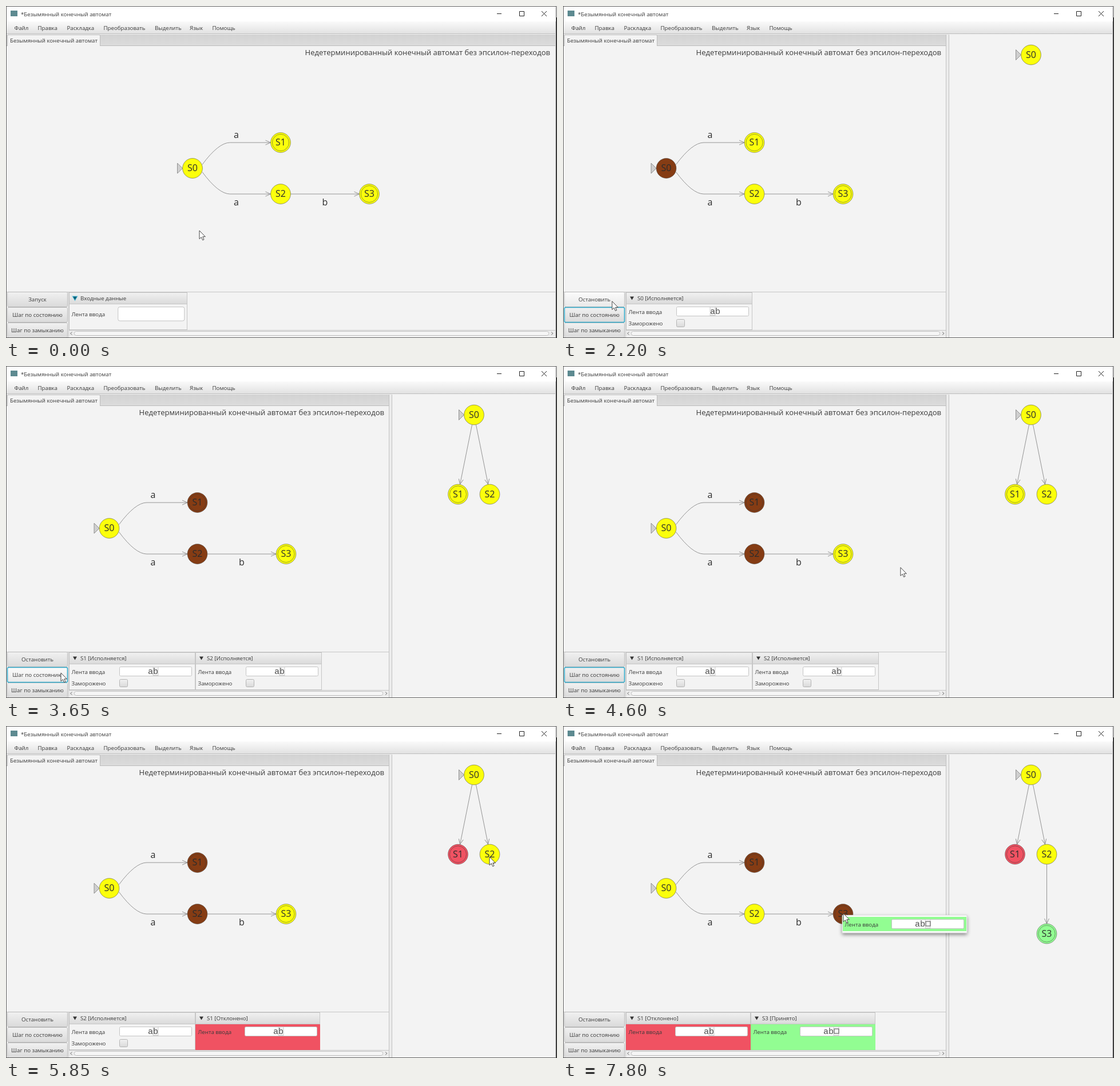
Write an HTML page that moves like this. It is 963x581 px and loops after 8 s.

```html
<!DOCTYPE html>
<html lang="ru">
<head>
<meta charset="utf-8">
<title>Конечный автомат</title>
<style>
html, body { margin: 0; width: 100%; height: 100%; overflow: hidden; background: #f3f3f3; }
svg { display: block; }
text { font: 9.7px "Open Sans", "Noto Sans", sans-serif; fill: #3a3a3a; white-space: pre; }
.head { font-size: 13.05px; }
.node { font-size: 16px; fill: #2c2c2c; }
.mono { font: 15px "Liberation Mono", monospace; fill: #505050; }
.mid { text-anchor: middle; }
.end { text-anchor: end; }
.line { fill: none; stroke: #8a8a8a; stroke-width: .9; }
</style>
</head>
<body>
<svg width="963" height="581" viewBox="0 0 963 581">
  <defs>
    <linearGradient id="bar" x2="0" y2="1"><stop stop-color="#fafafa"/><stop offset="1" stop-color="#e2e2e2"/></linearGradient>
    <linearGradient id="btn" x2="0" y2="1"><stop stop-color="#f1f1f1"/><stop offset="1" stop-color="#dadada"/></linearGradient>
    <linearGradient id="hot" x2="0" y2="1"><stop stop-color="#fbfbfb"/><stop offset="1" stop-color="#e9e9e9"/></linearGradient>
    <linearGradient id="strip" x2="0" y2="1"><stop stop-color="#d2d2d2"/><stop offset="1" stop-color="#dcdcdc"/></linearGradient>
    <filter id="shade" x="-10%" y="-30%" width="120%" height="180%"><feDropShadow dx="0" dy="3" stdDeviation="3" flood-opacity=".45"/></filter>
  </defs>
  <g id="scene"></g>
  <g id="arrow"><path d="M0 0V14.6L3.4 11.5L5.7 16.7L8 15.7L5.8 10.7H10.3Z" fill="#fff" stroke="#333" stroke-width=".9"/></g>
  <g id="beam"><path d="M-2.5-6.5H-.8L0-5.8L.8-6.5H2.5M0-5.8V5.8M-2.5 6.5H-.8L0 5.8L.8 6.5H2.5" fill="none" stroke="#333"/></g>
</svg>
<script>
const LOOP = 8000;
const FOCUS = 850, TYPE_A = 1200, TYPE_B = 1400, RUN = 2050, STEP = 3500,
      REJECT = 5200, ACCEPT = 6050, HINT = 7500;
const YELLOW = '#fbff0c', BROWN = '#853c14', RED = '#f05262', GREEN = '#92fd92', BLUE = '#2fa9c9';
const $ = id => document.getElementById(id);

// Pointer stops: time, x, y
const stops = [
  [0, 338, 393], [50, 338, 393], [850, 262, 539], [1500, 262, 539], [1950, 85, 515], [2150, 85, 515],
  [2450, 96, 537], [4250, 96, 537], [4600, 589, 353], [4980, 790, 228], [5500, 790, 228],
  [5850, 845, 229], [6700, 845, 229], [6800, 793, 245], [6900, 558, 305], [7080, 490, 328], [LOOP, 490, 328]
];

function speed(i, axis) {
  const a = stops[i - 1], b = stops[i], c = stops[i + 1];
  if (!a || !c || a[1] === b[1] || b[1] === c[1]) return 0;
  return (c[axis] - a[axis]) / (c[0] - a[0]);
}

function pointer(t) {
  const i = stops.findIndex(s => s[0] > t) - 1;
  const p = stops[i], q = stops[i + 1], span = q[0] - p[0], u = (t - p[0]) / span;
  return [1, 2].map(k => {
    const ease = u * u * (3 - 2 * u);
    return p[k] + (q[k] - p[k]) * ease +
      span * u * (1 - u) * (speed(i, k) * (1 - u) - speed(i + 1, k) * u);
  });
}

const rect = (x, y, w, h, fill, stroke = 'none', extra = '') =>
  `<rect x="${x}" y="${y}" width="${w}" height="${h}" fill="${fill}" stroke="${stroke}" ${extra}/>`;
const text = (x, y, s, cls = '') => `<text x="${x}" y="${y}" class="${cls}">${s}</text>`;
const path = (d, extra = 'class="line"') => `<path d="${d}" ${extra}/>`;

function node(x, y, name, fill = YELLOW, final = false) {
  const ring = r =>
    `<circle cx="${x}" cy="${y}" r="${r}" fill="${fill}" stroke="#333" stroke-opacity=".6" stroke-width=".8"/>`;
  return ring(17.4) + (final ? ring(14.6) : '') + text(x, y + 5.2, name, 'node mid');
}

const startMark = (x, y) =>
  path(`M${x - 26.5} ${y - 9}V${y + 9}L${x - 17.5} ${y}Z`, 'fill="#cfcfcf" stroke="#888" stroke-width=".9"');

function tip(x, y, angle = 0) {
  return `<path d="M-9-4L0 0L-9 4" class="line" transform="translate(${x} ${y}) rotate(${angle})"/>`;
}

function edge(x1, y1, x2, y2) {
  const angle = Math.atan2(y2 - y1, x2 - x1) * 180 / Math.PI;
  return path(`M${x1} ${y1}L${x2} ${y2}`) + tip(x2, y2, angle);
}

function button(y, label, focused, hovered) {
  return rect(2.5, y + .5, 105, 26, `url(#${hovered ? 'hot' : 'btn'})`, focused ? BLUE : '#b9b9b9',
    `rx="2" stroke-width="${focused ? 1.6 : 1}"`) + text(55, y + 16.5, label, 'mid');
}

// Tape field; the cell under the head stays in the middle
function tape(x, y, head) {
  const mid = x + 63.5;
  const cell = rect(mid - 4.5, y + .5, 9, 15, '#f6f6f6', '#c4c4c4', 'stroke-width=".8"');
  const end = head === 2 ? rect(mid - 3.5, y + 4, 8, 8, 'none', '#505050') : '';
  return rect(x + .5, y + .5, 126, 16, '#fff', '#c4c4c4', 'rx="2"') + cell +
    text(mid - 4.5 - 9 * head, y + 12.5, 'ab', 'mono') + end;
}

function paneHead(x, w, title, glow) {
  const mark = glow ? 'fill="#0b5f78" stroke="#5fc3dc" stroke-width="2" paint-order="stroke"' : 'fill="#333"';
  return rect(x + .5, 501.5, w - 1, 20, 'url(#btn)', '#c6c6c6') +
    path(`M${x + 7} 508.5H${x + 14}L${x + 10.5} 514.5Z`, mark) + text(x + 20, 515, title);
}

function pane(x, name, status, head) {
  const live = status === 'Исполняется', w = live ? 221 : 218;
  const fill = live ? '#f3f3f3' : status === 'Принято' ? GREEN : RED;
  return rect(x + .5, 521.5, w - 1, 45, fill, live ? '#c6c6c6' : fill) +
    paneHead(x, w, `${name} [${status}]`) +
    text(x + 4.5, 538.5, 'Лента ввода') + tape(x + (live ? 88 : 86), 526, head) +
    (live ? text(x + 4.5, 558.5, 'Заморожено') +
      rect(x + 88.5, 548.5, 14, 13, 'url(#btn)', '#b4b4b4', 'rx="2"') : '');
}

function inputPane(t) {
  const focused = t >= FOCUS;
  const typed = t < TYPE_A ? '' : t < TYPE_B ? 'a' : 'ab';
  const since = t - (t < TYPE_A ? FOCUS : t < TYPE_B ? TYPE_A : TYPE_B);
  const caretX = 203.5 + 9 * typed.length;
  return rect(110.5, 521.5, 206, 45, '#f3f3f3', '#c6c6c6') + paneHead(110, 207, 'Входные данные', !focused) +
    text(114.5, 542.5, 'Лента ввода') +
    rect(195.8, 526.7, 116, 24.3, '#fff', focused ? BLUE : '#c2c2c2', `rx="3" stroke-width="${focused ? 1.7 : 1}"`) +
    text(203.7, 543, typed, 'mono') +
    (focused && since % 1000 < 500 ? path(`M${caretX} 532V546`, 'stroke="#444"') : '');
}

function windowFrame(right) {
  const menu = [[14.5, 'Файл'], [55.5, 'Правка'], [106.5, 'Раскладка'], [170.5, 'Преобразовать'],
    [260, 'Выделить'], [321, 'Язык'], [360.5, 'Помощь']];
  return rect(0, 0, 963, 581, '#f3f3f3') + rect(0, 0, 963, 27, '#fff') +
    rect(8, 8, 12, 10, '#5d8a90') + text(26, 17.5, '*Безымянный конечный автомат') +
    path('M858 13.5H866M897.5 9.5H905.5V17.5H897.5ZM936 9L945 18M945 9L936 18', 'fill="none" stroke="#222"') +
    rect(0, 27, 963, 21, 'url(#bar)') + path('M0 48.5H961', 'stroke="#bdbdbd"') +
    menu.map(([x, s]) => text(x, 41.5, s)).join('') +
    rect(1, 50, right - 1, 20, 'url(#strip)') + path(`M1 69.5H${right}`, 'stroke="#bcbcbc"') +
    path('M2.5 70V52Q2.5 50.5 4 50.5H163Q164.5 50.5 164.5 52V70', 'fill="#f3f3f3" stroke="#bcbcbc"') +
    text(7, 64, 'Безымянный конечный автомат');
}

// Window border, with the dark desktop showing at the right edge
const windowEdge = () => path('M960.5 27V580', 'stroke="#c8c8c8"') +
  rect(.5, .5, 961, 580, 'none', '#606060') + rect(962, 0, 1, 20, '#d8d8d8') + rect(962, 20, 1, 561, '#1c1c1c');

function scrollBar(right) {
  return path(`M109.5 581V500.5H${right}M109 567.5H${right}`, 'fill="none" stroke="#c6c6c6"') +
    rect(110, 568, right - 110, 11, '#ececec') +
    rect(119.5, 569.5, right - 131, 7, '#f6f6f6', '#c0c0c0', 'rx="3"') +
    path(`M115.5 570.5L112.5 573L115.5 575.5M${right - 7} 570.5L${right - 4} 573L${right - 7} 575.5`,
      'fill="none" stroke="#777"');
}

function automaton(dx, active) {
  const fill = name => active.includes(name) ? BROWN : YELLOW;
  return `<g transform="translate(${dx})">` +
    path('M197.5 277.5Q226 239 246 239H317M197.5 290.5Q226 329 246 329H317M352 329H472') +
    tip(317, 239) + tip(317, 329) + tip(472, 329) + startMark(180.5, 284) +
    node(180.5, 284, 'S0', fill('S0')) + node(334.5, 239, 'S1', fill('S1'), true) +
    node(334.5, 329, 'S2', fill('S2')) + node(489.5, 329, 'S3', fill('S3'), true) +
    text(257, 231, 'a', 'node mid') + text(257, 349, 'a', 'node mid') + text(412, 349, 'b', 'node mid') + '</g>';
}

function tree(t) {
  let s = startMark(818, 85.5) + node(818, 85.5, 'S0');
  if (t >= STEP) s += edge(814.5, 103, 793.5, 207) + edge(821.5, 103, 842.5, 207) +
    node(790, 224.5, 'S1', t < REJECT ? YELLOW : RED, true) + node(845.5, 224.5, 'S2');
  if (t >= ACCEPT) s += edge(845.5, 242, 845.5, 346) + node(845.5, 363.5, 'S3', GREEN, true);
  return s;
}

function panes(t) {
  const live = 'Исполняется', no = 'Отклонено';
  if (t < RUN) return inputPane(t);
  if (t < STEP) return pane(110, 'S0', live, 0);
  if (t < REJECT) return pane(110, 'S1', live, 1) + pane(331, 'S2', live, 1);
  if (t < ACCEPT) return pane(110, 'S2', live, 1) + pane(331, 'S1', no, 1);
  return pane(110, 'S1', no, 1) + pane(328, 'S3', 'Принято', 2);
}

const hint = () => rect(488, 331, 218, 31, '#fbfbfb', '#c8c8c8', 'stroke-width=".6" filter="url(#shade)"') +
  rect(489, 334, 216, 25, GREEN) + text(492.5, 350.5, 'Лента ввода') + tape(574, 338, 2);

function scene(t, x, y) {
  const running = t >= RUN, right = running ? 670 : 960;
  const over = top => x < 108 && y >= top && y < top + 27;
  const active = !running ? [] : t < STEP ? ['S0'] : t < ACCEPT ? ['S1', 'S2'] : ['S1', 'S3'];
  return windowFrame(right) +
    text(running ? 661 : 951, 86, 'Недетерминированный конечный автомат без эпсилон-переходов', 'head end') +
    automaton(running ? 0 : 145.5, active) +
    path(`M1 500.5H${right}`, 'stroke="#c6c6c6"') + scrollBar(right) + panes(t) +
    button(500, running ? 'Остановить' : 'Запуск', false, over(500)) +
    button(554, 'Шаг по замыканию', false, over(554)) +
    button(527, 'Шаг по состоянию', running && t < REJECT, over(527)) +
    (running ? rect(670, 49, 4, 531, '#ebebeb') + path('M669.5 50V580M674.5 50V580', 'stroke="#c2c2c2"') + tree(t) : '') +
    windowEdge() + (t >= HINT ? hint() : '');
}

let shown = '';
function draw() {
  const t = performance.now() % LOOP, [x, y] = pointer(t);
  const markup = scene(t, x, y);
  if (markup !== shown) $('scene').innerHTML = shown = markup;
  const inField = t < RUN && x > 196 && x < 312 && y > 527 && y < 551;
  for (const id of ['arrow', 'beam']) {
    $(id).setAttribute('transform', `translate(${x} ${y})`);
    $(id).setAttribute('visibility', (id === 'beam') === inField ? 'visible' : 'hidden');
  }
  requestAnimationFrame(draw);
}
draw();
</script>
</body>
</html>
```
